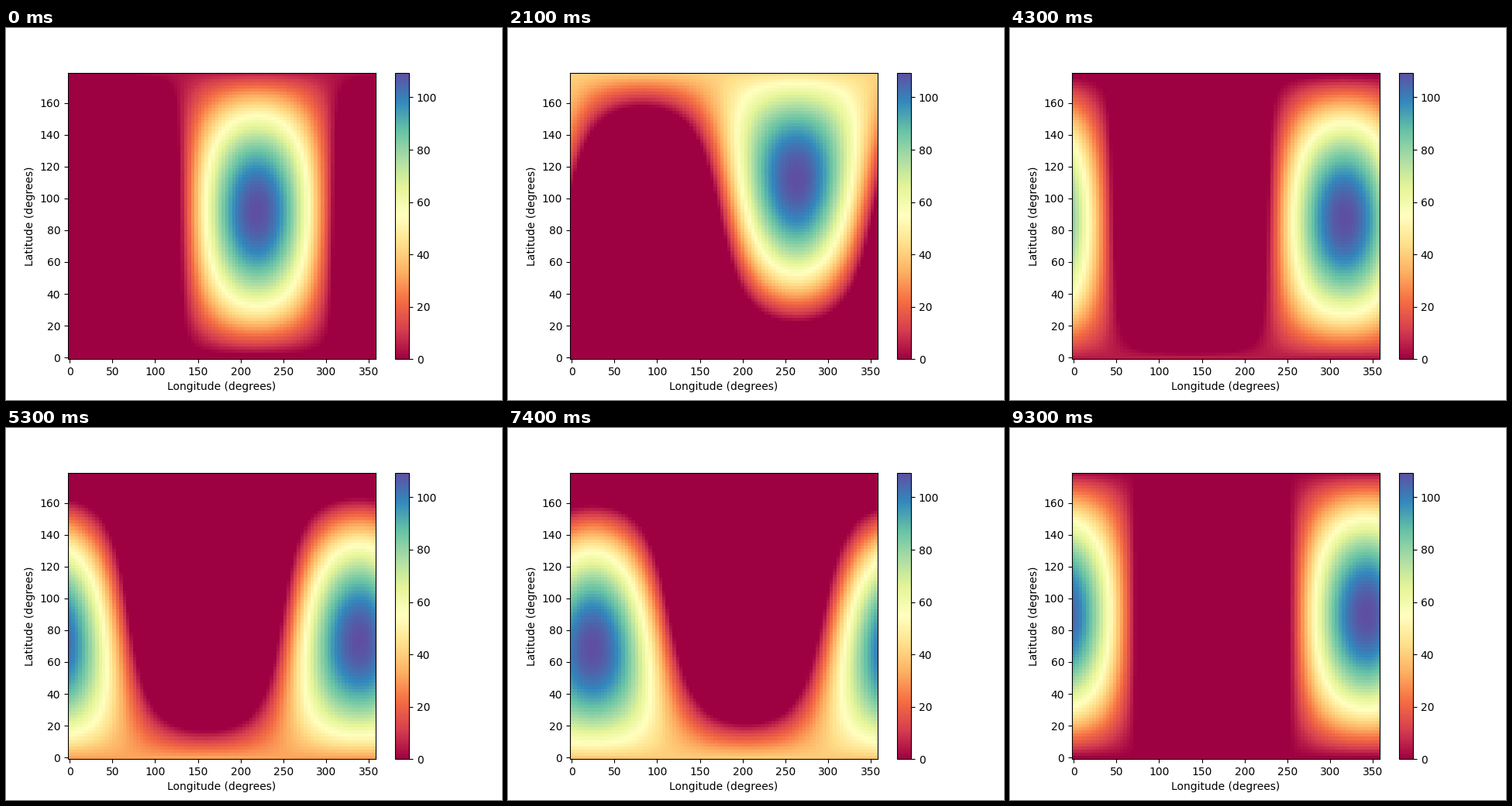
A matplotlib script for the animation above (9.4 s loop, 640 px wide and 480 px high).

```python
import numpy as np
import matplotlib.pyplot as plt
from matplotlib.animation import FuncAnimation

FRAMES = 94
YEAR = 94.17        # orbital period, in frames
SPIN = 36.16        # mean eastward step of the subsolar point, degrees per frame
PEAK_FLUX = 109.45

# Seasonal course: time in frames, longitude drift, declination
SEASONS = np.array([
    [0, 219.2, 1.9],
    [21, 223.6, 22.3],
    [34, 192.6, 10.7],
    [53, 222.5, -16.7],
    [65, 231.6, -24.0],
    [83, 222.7, -13.2],
    [93, 219.7, 0.0],
])


def periodic_spline(t, times, values, period):
    """Smooth curve through the given points, repeating every period."""
    x = np.concatenate([times[-2:] - period, times, times[:2] + period])
    y = np.concatenate([values[-2:], values, values[:2]])
    h = np.diff(x)
    slope = np.diff(y) / h
    tangent = (h[1:] * slope[:-1] + h[:-1] * slope[1:]) / (h[1:] + h[:-1])
    i = np.searchsorted(x, t, side="right") - 1
    u = (t - x[i]) / h[i]
    m0, m1 = tangent[i - 1] * h[i], tangent[i] * h[i]
    return (y[i] * (1 + 2 * u) * (1 - u) ** 2 + m0 * u * (1 - u) ** 2
            + y[i + 1] * u * u * (3 - 2 * u) + m1 * u * u * (u - 1))


def subsolar_point(n):
    times, drift, declination = SEASONS.T
    lon = SPIN * n + periodic_spline(n, times, drift, YEAR)
    lat = 90 + periodic_spline(n, times, declination, YEAR)
    return np.radians(lon), np.radians(lat)


lon = np.arange(0, 360, 4)
lat = np.arange(0, 180, 2)
LON, LAT = np.meshgrid(np.radians(lon), np.radians(lat))


def flux(n):
    sun_lon, sun_lat = subsolar_point(n)
    cos_zenith = (np.cos(LAT) * np.cos(sun_lat)
                  + np.sin(LAT) * np.sin(sun_lat) * np.cos(LON - sun_lon))
    return PEAK_FLUX * np.maximum(cos_zenith, 0)


fig, ax = plt.subplots(figsize=(6.4, 4.8), dpi=100)
mesh = ax.pcolormesh(lon, lat, flux(0), cmap="Spectral", shading="nearest")
ax.set_xlabel("Longitude (degrees)")
ax.set_ylabel("Latitude (degrees)")
fig.colorbar(mesh, ax=ax)


def update(n):
    data = flux(n)
    mesh.set_array(data)
    mesh.set_clim(0, data.max())
    return [mesh]


anim = FuncAnimation(fig, update, frames=FRAMES, interval=100, repeat=True,
                     repeat_delay=0, blit=False)
plt.show()
```
